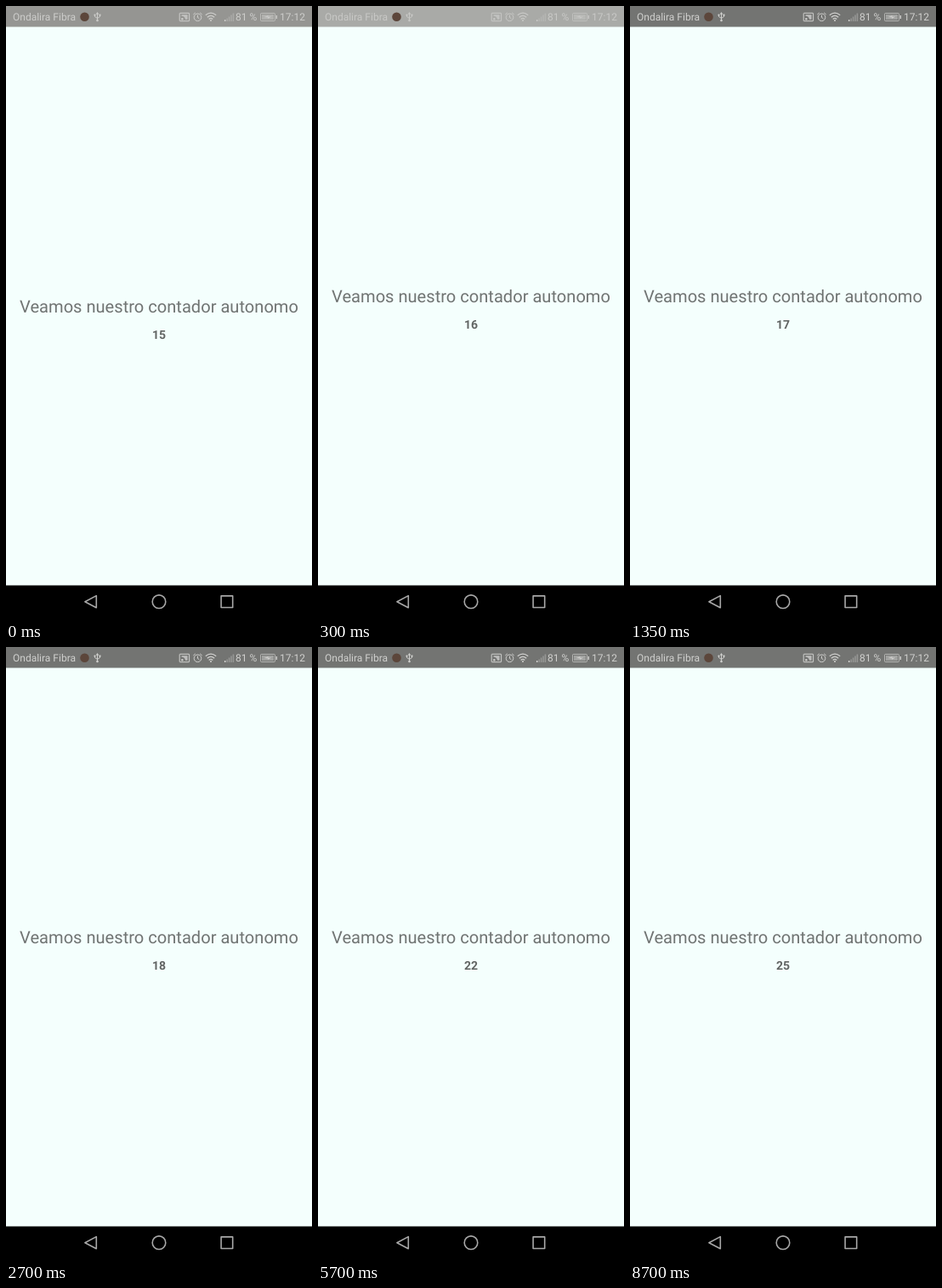
These frames come from a looping animation (360 by 720 pixels, 8850 ms). An HTML page:

```html
<!DOCTYPE html>
<html lang="es">
<head>
<meta charset="utf-8">
<style>
  html, body { margin: 0; height: 100%; overflow: hidden; background: #f4fffd; }
  svg { display: block; width: 360px; height: 720px; font-family: Roboto, sans-serif; text-rendering: geometricPrecision; }
  .line { fill: none; stroke: currentColor; }
  #icons { color: #d0d0ce; font-size: 12px; }
  #nav { color: #a8a8a8; stroke-width: 1.6; stroke-linejoin: round; }
</style>
</head>
<body>
<svg viewBox="0 0 360 720">
  <rect width="360" height="720" fill="#f4fffd"/>
  <rect id="bar" width="360" height="24.5"/>

  <g id="icons" fill="currentColor">
    <text x="8" y="17">Ondalira Fibra</text>
    <!-- USB -->
    <path class="line" d="M107.5 8.5V17M104.5 10.5V12.5L107.5 14.5L110.5 12.5V10.5"/>
    <path d="M105.7 9.7L107.5 7L109.3 9.7Z"/>
    <circle cx="107.5" cy="17" r="1.3"/>
    <circle cx="104.5" cy="10.7" r="1.1"/>
    <rect x="109.5" y="9.6" width="2" height="2"/>
    <!-- cast -->
    <rect class="line" x="204.2" y="8.3" width="11.4" height="9.4" rx=".5"/>
    <path d="M206.5 10.3H213.6V15.7H211A4.2 4.2 0 0 0 206.5 11.8Z" opacity=".8"/>
    <circle cx="207.3" cy="15.2" r="1.2"/>
    <!-- alarm -->
    <circle class="line" cx="225.5" cy="13.3" r="4.3"/>
    <path class="line" d="M225.5 10.7V13.5L227.4 14.7M220.3 10L222.8 7.9M230.7 10L228.2 7.9"/>
    <!-- Wi-Fi -->
    <path class="line" stroke-width="1.3" d="M234.8 10.8Q241 5.6 247.2 10.8M236.8 13.2Q241 9.7 245.2 13.2M238.7 15.4Q241 13.5 243.3 15.4"/>
    <circle cx="241" cy="17" r="1"/>
    <!-- signal -->
    <path class="line" stroke-width="1.5" d="M257.7 18V16"/>
    <path class="line" stroke-width="1.5" opacity=".4" d="M260.2 18V14.5M262.6 18V12.5M265 18V10.5M267.4 18V8.5"/>
    <text x="270" y="17">81 %</text>
    <!-- battery -->
    <rect class="line" x="299.5" y="8.5" width="17" height="9" rx="1" opacity=".7"/>
    <rect x="301" y="10" width="14" height="6" opacity=".5"/>
    <path d="M303.5 13L308.5 11.2V12.4H312.5L308 14.8V13.6Z"/>
    <rect x="317.6" y="11" width="1.4" height="4"/>
    <text x="352" y="17" text-anchor="end">17:12</text>
  </g>
  <circle id="badge" cx="92.5" cy="12.7" r="5.3" fill="#5c463b"/>

  <g id="content" text-anchor="middle">
    <text x="180" y="348" font-size="20.1" fill="#707473">Veamos nuestro contador autonomo</text>
    <text id="count" x="180" y="378.5" font-size="14" font-weight="700" fill="#626564"></text>
  </g>

  <rect y="680.5" width="360" height="39.5"/>
  <g id="nav" class="line">
    <path d="M92.9 699.7L106.3 692.6V706.8Z"/>
    <circle cx="180" cy="699.7" r="7.8"/>
    <rect x="253.1" y="692.9" width="13.6" height="13.6"/>
  </g>
</svg>
<script>
  const LOOP = 8850, STEP = 150, TICK = 970, FIRST_TICK = 848;
  // Status bar look while it hides and returns: [colour, icon opacity]
  const barStates = [['#959592', .95], ['#fbfbf6', 0], ['#a9aaa7', .8], ['#737472', 1]];
  const el = id => document.getElementById(id);
  const bar = el('bar'), icons = el('icons'), badge = el('badge');
  const content = el('content'), count = el('count');

  function render(now) {
    const step = Math.floor(now % LOOP / STEP), t = step * STEP;
    const [colour, opacity] = barStates[Math.min(step, 3)];
    bar.setAttribute('fill', colour);
    icons.setAttribute('opacity', opacity);
    badge.setAttribute('opacity', step === 1 ? .75 : 1);
    content.setAttribute('transform', `translate(0 ${step ? 0 : 12})`);
    count.textContent = step ? 17 + Math.floor((t - FIRST_TICK) / TICK) : 15;
  }

  const start = performance.now();
  function loop() {
    render(performance.now() - start);
    requestAnimationFrame(loop);
  }
  loop();
</script>
</body>
</html>
```
